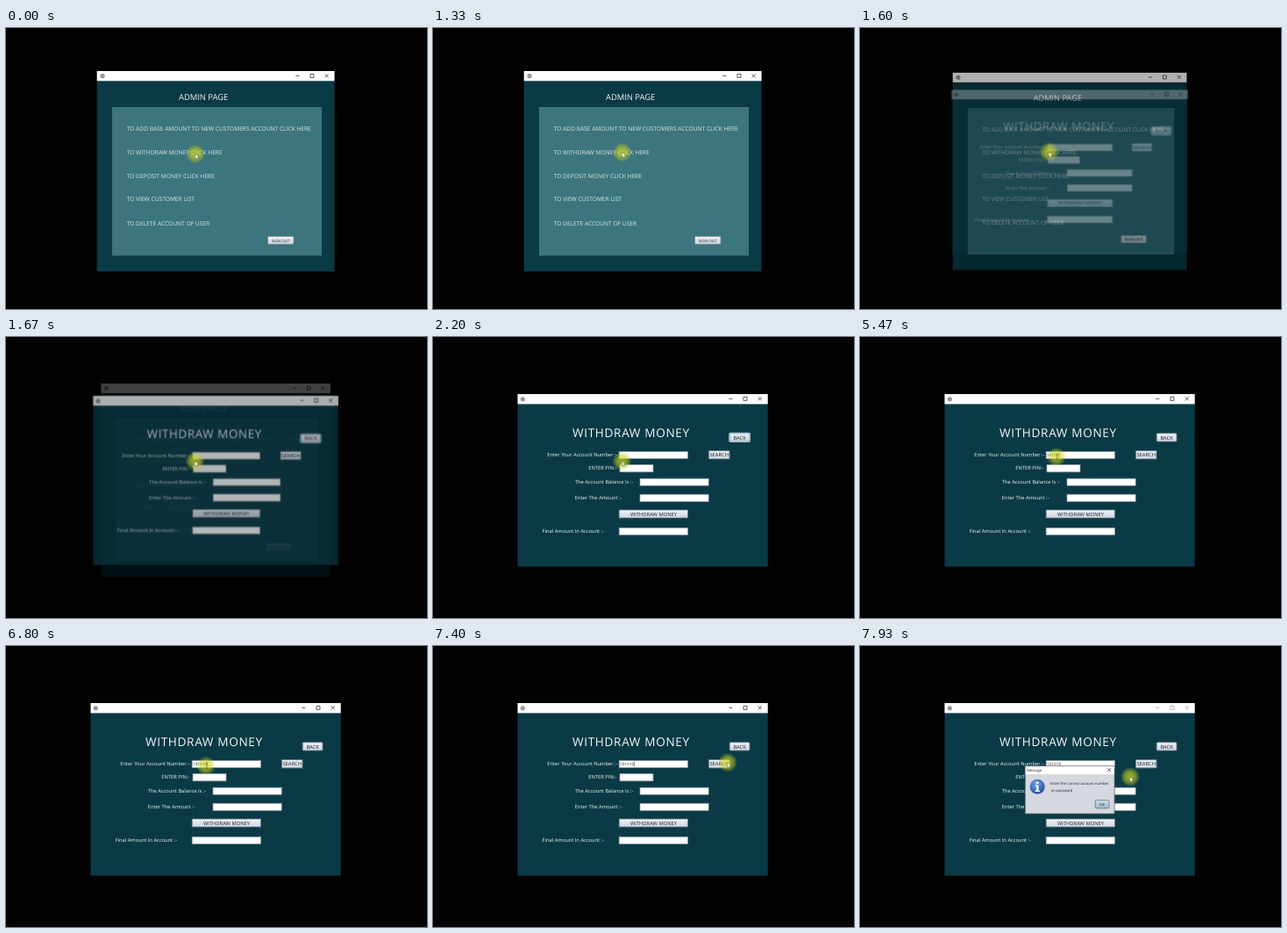
Recreate the animation shown at these times as an HTML page. Size 480 by 320 pixels, loop 8000 ms.

```html
<!DOCTYPE html>
<html lang="en">
<head>
<meta charset="utf-8">
<title>Withdraw money</title>
<style>
html, body { margin: 0; width: 100%; height: 100%; overflow: hidden; background: #020202; }
svg { display: block; width: 480px; height: 320px; }
text { font-family: "Open Sans", "Noto Sans", sans-serif; fill: #f2f6f7; text-rendering: geometricPrecision; white-space: pre; }

.bar { fill: #fdfdfd; }
.body { fill: #0a3a46; }
.panel { fill: #3c757d; }
.link { font-size: 6.65px; fill: #dde9ea; }
.label { font-size: 5.77px; }
.field { fill: #fff; stroke: #8b9aa2; stroke-width: .7; }
.btn { fill: url(#btn); stroke: #71808c; stroke-width: .8; }
.cap { font-size: 5.8px; fill: #1c2024; text-anchor: middle; }
.small { font-size: 4.2px; fill: #1c2024; }
.ctl { fill: none; stroke: #333; stroke-width: .8; }

/* Every part shares one 8 s clock that moves in 1/15 s steps. */
.anim { animation: 8s step-end infinite; }
#admin, #withdraw { transform-origin: 239px 163px; }
#admin { animation-name: leave; }
#withdraw { animation-name: enter; }
#dialog { transform-origin: 239px 164px; animation-name: popup; }
#focus { animation-name: blur; }
#idle { animation-name: idle; }
#typed { animation-name: type; }
#caret { animation-name: caret; }
#pointer { animation-name: move; }
#arrow { animation-name: arrow; }
#beam { animation-name: beam; }

@keyframes leave {
  0% { opacity: 1; transform: none; }
  20% { opacity: .7; transform: scale(.985); }
  20.83% { opacity: .25; transform: scale(.965); }
  21.66% { opacity: .06; transform: scale(.945); }
  22.5%, 100% { opacity: 0; transform: scale(.93); }
}
@keyframes enter {
  0% { opacity: 0; transform: scale(.92); }
  20% { opacity: .3; transform: scale(.945); }
  20.83% { opacity: .68; transform: scale(.98); }
  21.66% { opacity: .87; transform: scale(.991); }
  22.5% { opacity: .97; transform: scale(.997); }
  23.33%, 100% { opacity: 1; transform: none; }
}
@keyframes popup {
  0% { opacity: 0; transform: scale(.94); }
  95% { opacity: .35; transform: scale(.96); }
  95.83% { opacity: .8; transform: scale(.99); }
  96.66%, 100% { opacity: 1; transform: none; }
}
@keyframes blur { 0% { opacity: 1; } 42.5%, 100% { opacity: 0; } }
@keyframes idle { 0% { stroke: #333; } 95%, 100% { stroke: #a4a4a4; } }
@keyframes type {
  0% { width: 0; }
  55% { width: 2.69px; }
  56.66% { width: 5.38px; }
  58.33% { width: 8.07px; }
  61.66% { width: 10.76px; }
  63.33% { width: 13.45px; }
  75.83%, 100% { width: 17px; }
}
@keyframes caret {
  0% { opacity: 0; transform: none; }
  42.5% { opacity: 1; transform: none; }
  55% { opacity: 1; transform: translateX(2.69px); }
  56.66% { opacity: 1; transform: translateX(5.38px); }
  58.33% { opacity: 1; transform: translateX(8.07px); }
  61.66% { opacity: 1; transform: translateX(10.76px); }
  63.33% { opacity: 1; transform: translateX(13.45px); }
  75.83% { opacity: 1; transform: translateX(16.14px); }
  95%, 100% { opacity: 0; transform: translateX(16.14px); }
}
@keyframes move {
  0% { transform: translate(216px, 143.3px); }
  1.66% { transform: translate(215.7px, 142.5px); }
  8.33% { transform: translate(216.3px, 142px); }
  14.16% { transform: translate(215.7px, 141.6px); }
  16.66% { transform: translate(215.5px, 141.3px); }
  40.83% { transform: translate(217px, 140.5px); }
  41.66% { transform: translate(221px, 138.3px); }
  42.5% { transform: translate(223.6px, 136.9px); }
  43.33% { transform: translate(224px, 136.5px); }
  85% { transform: translate(228px, 136.5px); }
  85.83% { transform: translate(238px, 136.2px); }
  86.66% { transform: translate(254px, 135.8px); }
  87.5% { transform: translate(274px, 135.3px); }
  88.33% { transform: translate(294px, 134.7px); }
  89.16% { transform: translate(312px, 134px); }
  90% { transform: translate(324px, 133.4px); }
  90.83% { transform: translate(332px, 133px); }
  91.66% { transform: translate(335px, 132.7px); }
  92.5% { transform: translate(336px, 132.6px); }
  95.83% { transform: translate(334px, 134px); }
  96.66% { transform: translate(326px, 139px); }
  97.5% { transform: translate(315px, 145px); }
  98.33% { transform: translate(308px, 149px); }
  99.16%, 100% { transform: translate(305.5px, 150.3px); }
}
@keyframes arrow { 0% { opacity: 1; } 42.5% { opacity: 0; } 88.33%, 100% { opacity: 1; } }
@keyframes beam { 0% { opacity: 0; } 42.5% { opacity: 1; } 88.33%, 100% { opacity: 0; } }
</style>
</head>
<body>
<svg viewBox="0 0 480 320">
  <defs>
    <linearGradient id="btn" x2="0" y2="1">
      <stop offset="0" stop-color="#f6f8fb"/>
      <stop offset=".5" stop-color="#dde3ea"/>
      <stop offset="1" stop-color="#cfd8e1"/>
    </linearGradient>
    <linearGradient id="ok" x2="0" y2="1">
      <stop offset="0" stop-color="#d5e1ea"/>
      <stop offset="1" stop-color="#9fb6c6"/>
    </linearGradient>
    <radialGradient id="blue" cx=".4" cy=".3" r=".75">
      <stop offset="0" stop-color="#6f9fe0"/>
      <stop offset="1" stop-color="#1f4fa3"/>
    </radialGradient>
    <radialGradient id="glow">
      <stop offset="0" stop-color="#d8de1c" stop-opacity=".72"/>
      <stop offset=".5" stop-color="#d0d81c" stop-opacity=".58"/>
      <stop offset=".8" stop-color="#c4cf1c" stop-opacity=".3"/>
      <stop offset="1" stop-color="#c0cc1c" stop-opacity="0"/>
    </radialGradient>
    <clipPath id="clip"><rect id="typed" class="anim" x="213" y="130" width="0" height="9"/></clipPath>
    <path id="controls" d="M-18.7 0h4M-2 -2h4v4h-4zM14.7 -2l4 4m0 -4l-4 4"/>
  </defs>

  <g id="admin" class="anim">
    <rect class="body" x="103.7" y="49" width="270.8" height="228.3"/>
    <rect class="bar" x="103.7" y="49" width="270.8" height="11.3"/>
    <circle cx="110" cy="54.7" r="2.6" fill="#93979c"/>
    <use href="#controls" class="ctl" x="349" y="54.4"/>
    <rect class="panel" x="121" y="90" width="239" height="169.3"/>
    <text x="197" y="82.2" font-size="9.4">ADMIN PAGE</text>
    <g class="link">
      <text class="link" x="137.7" y="117.3">TO ADD BASE AMOUNT TO NEW CUSTOMERS ACCOUNT CLICK HERE</text>
      <text class="link" x="137.7" y="143.7">TO WITHDRAW MONEY CLICK HERE</text>
      <text class="link" x="137.7" y="171.2">TO DEPOSIT MONEY CLICK HERE</text>
      <text class="link" x="137.7" y="197.4">TO VIEW CUSTOMER LIST</text>
      <text class="link" x="137.7" y="224.7">TO DELETE ACCOUNT OF USER</text>
    </g>
    <rect class="btn" x="298.5" y="237.3" width="29.5" height="8.9" rx="1"/>
    <text class="cap" x="313.2" y="243.5" style="font-size:4.5px">SIGN OUT</text>
  </g>

  <g id="withdraw" class="anim">
    <rect class="body" x="96.5" y="65" width="285.2" height="196.5"/>
    <rect class="bar" x="96.5" y="65" width="285.2" height="11.4"/>
    <circle cx="102.3" cy="70.8" r="2.6" fill="#93979c"/>
    <g id="idle" class="ctl anim"><use href="#controls" x="356" y="70.3"/></g>
    <text x="159" y="113.7" font-size="13.6" letter-spacing=".65">WITHDRAW MONEY</text>

    <text class="label" x="130.3" y="136.4">Enter Your Account Number :-</text>
    <text class="label" x="177.3" y="151.4">ENTER PIN:-</text>
    <text class="label" x="161.7" y="167.3">The Account Balance Is :-</text>
    <text class="label" x="161.7" y="185.4">Enter The Amount :-</text>
    <text class="label" x="124.5" y="223.4">Final Amount In Account :-</text>

    <rect class="field" x="212.2" y="130.5" width="78.3" height="8"/>
    <rect class="field" x="213" y="145.4" width="38" height="8.4"/>
    <rect class="field" x="236" y="161.2" width="78.2" height="8"/>
    <rect class="field" x="236" y="179.2" width="78.2" height="8.2"/>
    <rect class="field" x="212.2" y="217.3" width="78.3" height="8"/>

    <rect class="btn" x="338.2" y="109.8" width="22.8" height="9.2" rx="1"/>
    <rect id="focus" class="anim" x="337.8" y="109.3" width="23.6" height="10.2" rx="1.4" fill="none" stroke="#a9c3dc" stroke-width="1.2"/>
    <text class="cap" x="349.6" y="116.5">BACK</text>
    <rect class="btn" x="314.4" y="129.7" width="23.6" height="9.2"/>
    <text class="cap" x="326.2" y="136.4">SEARCH</text>
    <rect class="btn" x="212.2" y="197" width="78.3" height="9"/>
    <text class="cap" x="251.5" y="203.6">WITHDRAW MONEY</text>

    <text x="213" y="136.3" clip-path="url(#clip)" style="font-size:4.7px;fill:#222">101010</text>
    <path id="caret" class="anim" d="M213.4 131.7v5.6" stroke="#222" stroke-width=".6"/>
  </g>

  <g id="dialog" class="anim">
    <rect x="188.3" y="136.8" width="101.8" height="54.2" fill="#d5d8de" stroke="#5b6670" stroke-width=".8"/>
    <rect class="bar" x="188.7" y="137.2" width="101" height="8.8"/>
    <text class="small" x="190" y="143">Message</text>
    <path class="ctl" d="M282.3 139.2l3.8 3.8m0 -3.8l-3.8 3.8"/>
    <circle cx="202.2" cy="160.3" r="8.5" fill="url(#blue)"/>
    <circle cx="202.2" cy="155.8" r="1.5" fill="#fff"/>
    <path d="M200 158.6h3.5v6h1.3v1.4h-5v-1.4h1.4v-4.6h-1.2z" fill="#fff"/>
    <text class="small" x="217" y="158.3">Enter the Correct account number</text>
    <text class="small" x="218" y="165.5">or password</text>
    <rect x="268.2" y="175.6" width="15.8" height="9.2" rx="1.4" fill="url(#ok)" stroke="#5f7686" stroke-width=".8"/>
    <text class="cap" x="276.1" y="181.8" style="font-size:4.4px">OK</text>
  </g>

  <g id="pointer" class="anim">
    <circle r="11" fill="url(#glow)"/>
    <path id="arrow" class="anim" d="M-.3 -.3v6l1.4 -1.2 1 2.2 1.1 -.5 -1 -2.1h1.9z" fill="#fff" stroke="#333" stroke-width=".4"/>
    <path id="beam" class="anim" d="M-.3 -3h2.2M.8 -3v6M-.3 3h2.2" fill="none" stroke="#444" stroke-width=".5"/>
  </g>
</svg>
</body>
</html>
```
